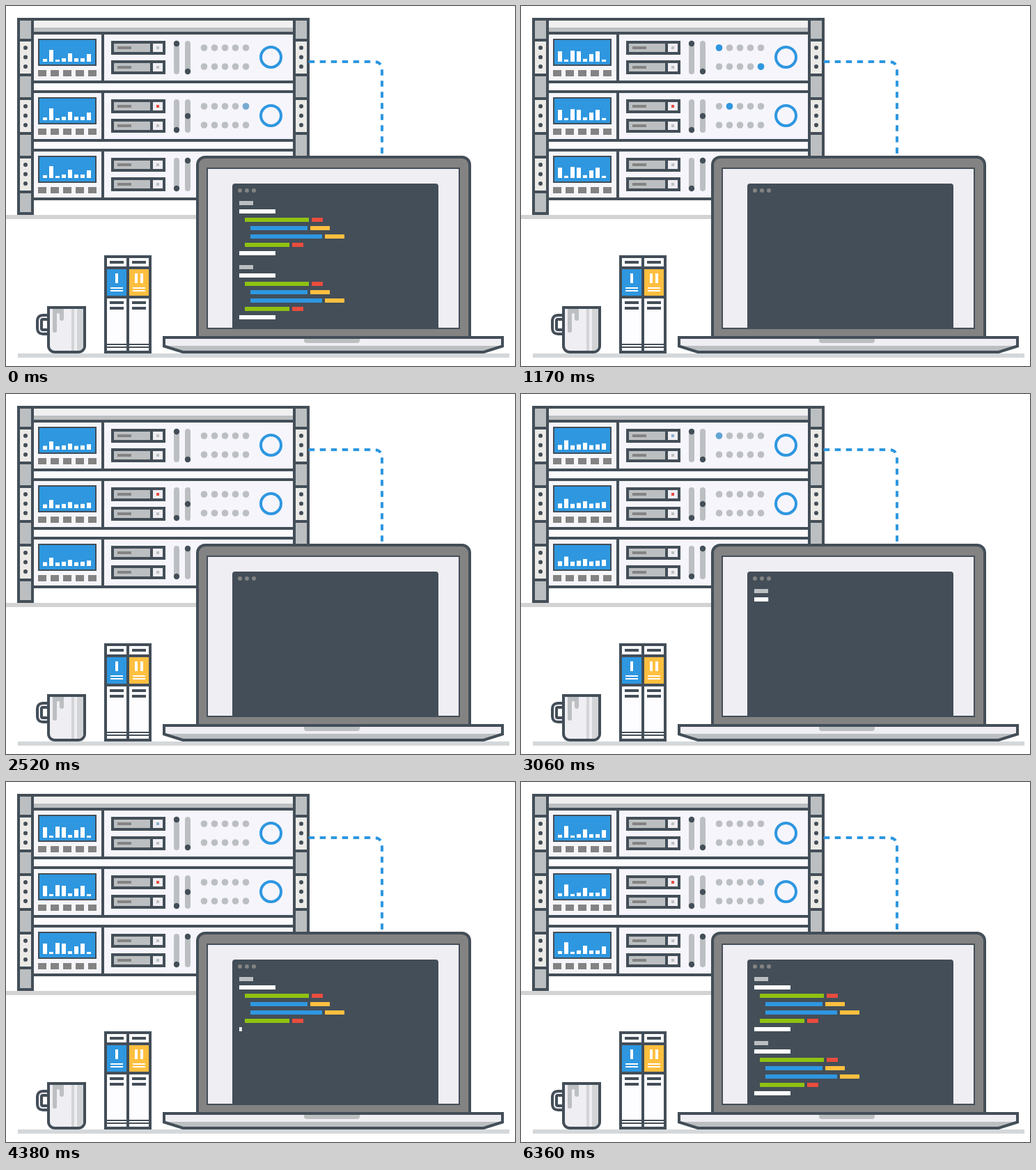
Animation of 731x517 px, one loop 6.39 s. Source, as an HTML page with a canvas:

```html
<!DOCTYPE html>
<html lang="en">
<head>
<meta charset="utf-8">
<title>Server and laptop</title>
<style>
html, body { margin: 0; width: 100%; height: 100%; overflow: hidden; background: #fff; }
canvas { display: block; width: 731px; height: 517px; }
</style>
</head>
<body>
<canvas id="stage" width="731" height="517"></canvas>
<script>
const LOOP = 6390;
const ctx = document.getElementById('stage').getContext('2d');
const DARK = '#434e58', BLUE = '#2e97e0', GRAY = '#bcbfc1', MID = '#838383',
  PALE = '#efeef3', PANEL = '#f6f5fc', GREEN = '#8fc212', RED = '#e84c3d',
  AMBER = '#ffbf40', WHITE = '#fff';

// The equaliser swings between these two poses
const LOW = [4, 17, 3, 5, 12, 5, 5, 11];
const HIGH = [15, 3, 16, 15, 4, 11, 15, 3];
const SWINGS = 8, REST = 1980;

// Code lines: indent, then bar widths; colours follow the indent
const LINES = [[0, 20], [0, 52], [8, 92, 16], [16, 82, 28], [16, 103, 28], [8, 64, 16], [0, 52]];
const INK = { 0: [WHITE], 8: [GREEN, RED], 16: [BLUE, AMBER] };
const TYPE_START = 2850, BAR_TIME = 152, FADE_START = 450, FADE_TIME = 450;

// Blinking lights: place, first peak, blinks per loop, half width in ms
const lamp = (col, y) => () => dot(284.5 + 15 * col, y, 4.8, BLUE);
const drive = y => () => box(216, y - 2, 4, 4, BLUE);
const LIGHTS = [
  [lamp(0, 60), 1170, 3, 400],
  [lamp(4, 87), 1170, 3, 150],
  [lamp(1, 144), 1170, 1, 200],
  [lamp(4, 144), 80, 5, 115],
  [drive(60), 3720, 1, 850],
  [drive(256), 547, 8, 100]
];

const clamp = v => Math.max(0, Math.min(1, v));
const mix = (a, b, k) => a + (b - a) * k;

function glow(t, peak, count, width) {
  const period = LOOP / count;
  const phase = (t - peak + LOOP) % period;
  return clamp(1.6 * (1 - Math.min(phase, period - phase) / width));
}

function box(x, y, w, h, fill) {
  ctx.fillStyle = fill;
  ctx.fillRect(x, y, w, h);
}

function frame(x, y, w, h, line, fill) {
  box(x, y, w, h, DARK);
  box(x + line, y + line, w - 2 * line, h - 2 * line, fill);
}

function round(x, y, w, h, r, fill) {
  ctx.fillStyle = fill;
  ctx.beginPath();
  ctx.roundRect(x, y, w, h, r);
  ctx.fill();
}

function dot(x, y, r, fill) {
  ctx.fillStyle = fill;
  ctx.beginPath();
  ctx.arc(x, y, r, 0, 2 * Math.PI);
  ctx.fill();
}

function stroke(path, width, color, dash = []) {
  ctx.strokeStyle = color;
  ctx.lineWidth = width;
  ctx.setLineDash(dash);
  ctx.stroke(new Path2D(path));
  ctx.setLineDash([]);
}

function post(x) {
  frame(x, 17, 24, 283, 4, GRAY);
  for (let y = 47; y < 240; y += 84) {
    box(x, y, 24, 54, DARK);
    box(x + 4, y + 4, 16, 46, '#ebeae6');
    for (let i = 0; i < 3; i++) dot(x + 12, y + 13 + 13.5 * i, 3, DARK);
  }
}

function server(y, knobs, led) {
  box(38, y, 376, 74, DARK);
  box(40, y + 4, 97, 66, '#f5f5fa');
  box(141, y + 4, 271, 66, PANEL);
  frame(46, y + 10, 84, 39, 2, BLUE);
  for (let i = 0; i < 5; i++) box(46 + 18 * i, y + 55, 12, 9, MID);
  for (const d of [13, 41]) {
    frame(151, y + d, 78, 20, 4, PALE);
    box(155, y + d + 4, 52, 12, GRAY);
    box(207, y + d + 4, 4, 12, DARK);
    box(160, y + d + 8, 20, 4, MID);
    box(216, y + d + 8, 4, 4, d === 13 ? led : GRAY);
  }
  knobs.forEach((k, i) => {
    round(241 + 16 * i, y + 13, 8, 48, 4, GRAY);
    dot(245 + 16 * i, y + k, 4.2, DARK);
  });
  for (let i = 0; i < 10; i++)
    dot(284.5 + 15 * (i % 5), y + (i < 5 ? 23 : 50), 4.8, GRAY);
  ctx.strokeStyle = BLUE;
  ctx.lineWidth = 4;
  ctx.beginPath();
  ctx.arc(380.5, y + 36.5, 14.5, 0, 2 * Math.PI);
  ctx.stroke();
}

function rack() {
  box(0, 300, 274, 6, '#d3d3d3');
  box(16, 17, 420, 24, DARK);
  box(40, 21, 372, 10, '#f0f0f0');
  box(40, 31, 372, 6, GRAY);
  box(40, 111, 372, 94, '#fbfbfe');
  server(37, [17, 57], GRAY);
  server(121, [57, 37], RED);
  server(205, [57, 17], GRAY);
  post(16);
  post(412);
  stroke('M434.7 80H528Q540 80 540 92V215', 4, BLUE, [8.5, 7.5]);
}

function equaliser(t) {
  const swing = (1 - Math.cos(2 * Math.PI * SWINGS * t / LOOP)) / 2;
  const gain = clamp((Math.abs(t - REST) - 30) / 600);
  for (let s = 0; s < 3; s++)
    LOW.forEach((low, i) => {
      const h = gain * mix(low, HIGH[i], swing);
      box(53 + 9 * i, Math.round(80 + 83.6 * s) - h, 6, h, WHITE);
    });
}

function lights(t) {
  for (const [paint, ...pulse] of LIGHTS) {
    ctx.globalAlpha = glow(t, ...pulse);
    paint();
  }
  ctx.globalAlpha = 1;
}

function books() {
  box(141, 358, 68, 141, DARK);
  [[145, BLUE], [177, AMBER]].forEach(([x, color], i) => {
    box(x, 362, 28, 12, WHITE);
    box(x, 378, 28, 38, color);
    box(x, 420, 28, 75, '#fdfdff');
    for (const y of [366, 424, 432]) box(x + 4, y, 20, 4, DARK);
    for (const y of [404, 408]) box(x + 5, y, 18, 2, WHITE);
    for (const y of [485, 489]) box(x, y, 28, 2, DARK);
    for (const d of i ? [8, 16] : [12]) box(x + d, 384, 4, 14, WHITE);
  });
}

function mug() {
  const handle = 'M62 447H53Q48 447 48 452V463Q48 468 53 468H62';
  stroke(handle, 10, DARK);
  stroke(handle, 2, PALE);
  round(59, 431, 56, 68, [0, 0, 11, 11], DARK);
  round(63, 435, 48, 60, [0, 0, 7, 7], PALE);
  box(94, 435, 4, 60, '#d2d4d6');
  round(102, 435, 9, 60, [0, 0, 7, 0], '#d2d4d6');
  box(67, 435, 16, 7, GRAY);
  round(67, 435, 6, 34, [0, 0, 3, 3], GRAY);
  round(77, 435, 6, 17, [0, 0, 3, 3], GRAY);
  round(73, 441, 4, 6, [2, 2, 0, 0], PALE);
}

function laptop() {
  round(273, 215, 395, 262, [13, 13, 0, 0], DARK);
  round(277, 219, 387, 258, [9, 9, 0, 0], MID);
  frame(288, 232, 364, 232, 2, PALE);
  round(325, 255, 296, 207, [4, 4, 0, 0], DARK);
  for (const x of [336, 346, 356]) dot(x, 265, 3, MID);

  const rim = 'H713V488.5L686 497H254L227 488.5Z';
  ctx.fillStyle = PALE;
  ctx.fill(new Path2D('M227 476' + rim));
  ctx.fillStyle = GRAY;
  ctx.fill(new Path2D('M227 488' + rim));
  stroke('M227 476' + rim, 4, DARK);
  round(428, 477, 80, 7, [0, 0, 4, 4], GRAY);
  box(428, 474, 80, 4, DARK);
}

function code(t) {
  const old = t < FADE_START + FADE_TIME;
  let left = old ? Infinity : (t - TYPE_START) / BAR_TIME;
  ctx.globalAlpha = old ? 1 - clamp((t - FADE_START) / FADE_TIME) : 1;
  for (const top of [280, 372])
    LINES.forEach(([indent, ...widths], row) => {
      let x = 335 + indent;
      widths.forEach((w, i) => {
        const color = row ? INK[indent][i] : GRAY;
        box(x, top + 12 * row, w * clamp(left--), 6, color);
        x += w + 4;
      });
    });
  ctx.globalAlpha = 1;
}

function draw(now) {
  const t = now % LOOP;
  box(0, 0, 731, 517, WHITE);
  rack();
  equaliser(t);
  lights(t);
  box(17, 499, 706, 6, '#d4d8da');
  books();
  mug();
  laptop();
  code(t);
}

const begin = performance.now();
function tick() {
  draw(performance.now() - begin);
  requestAnimationFrame(tick);
}
tick();
</script>
</body>
</html>
```
